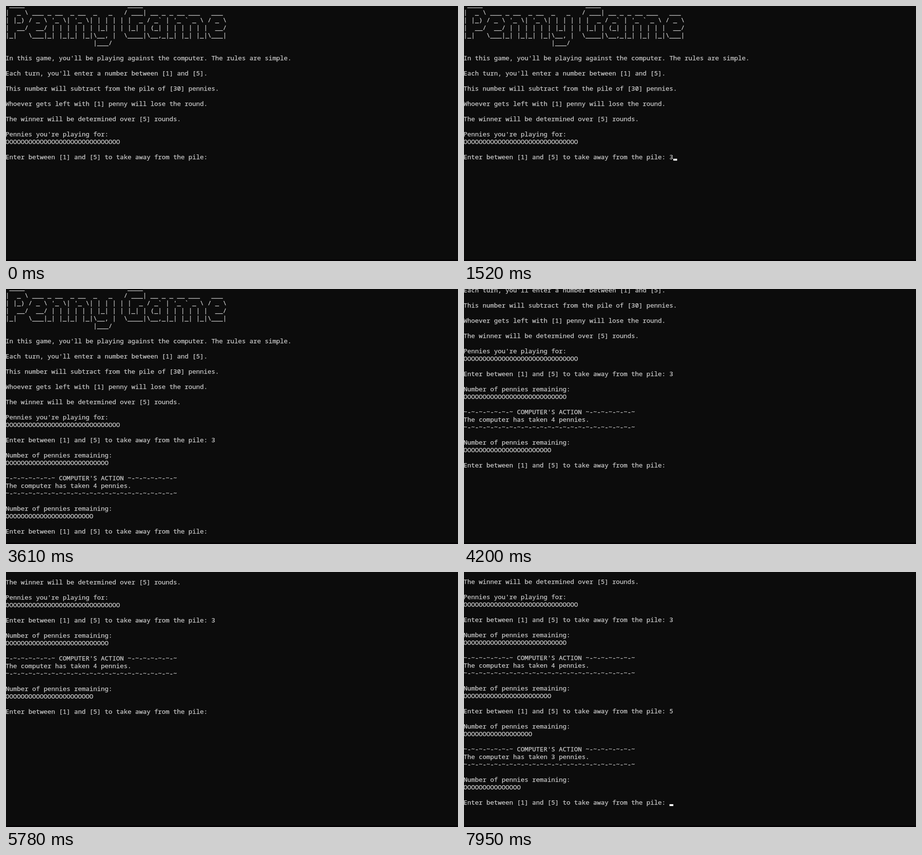
Write an HTML page that moves like this. It is 948x536 px and loops after 8 s.

```html
<!DOCTYPE html>
<html lang="en">
<head>
<meta charset="utf-8">
<title>Penny Game</title>
<style>
  html, body {
    margin: 0;
    width: 100%;
    height: 100%;
    overflow: hidden;
    background: #0c0c0c;
  }
  .stage {
    position: relative;
    width: 100%;
    height: 100%;
    overflow: clip;
    contain: strict;
  }
  /* Console cells are 8 x 16 px. */
  .screen {
    position: absolute;
    left: -1px;
    top: -11px;
    margin: 0;
    color: #ccc;
    font: calc(40px / 3)/16px "Noto Sans Mono", "DejaVu Sans Mono", monospace;
    font-variant-ligatures: none;
    -webkit-text-stroke: 0.25px #ccc;
    white-space: pre;
    animation: scroll 8s step-end infinite;
  }
  .edge {
    position: absolute;
    left: 0;
    right: 0;
    bottom: 0;
    height: 3px;
    background: #040204;
  }
  .screen span { opacity: 0; animation: 8s step-end infinite; }
  .screen .key1 { animation-name: key1; }
  .screen .turn1 { animation-name: turn1; }
  .screen .key2 { animation-name: key2; }
  .screen .turn2 { animation-name: turn2; }
  .cursor {
    position: absolute;
    left: 440px;
    top: 332px;
    width: 8px;
    height: 4px;
    background: #fff;
    opacity: 0;
    animation: blink 8s step-end infinite, move 8s step-end infinite;
  }

  @keyframes scroll {
    52.5% { top: -150px; }
    63.375% { top: -223px; }
    72.25% { top: -227px; }
    74.25%, 100% { top: -228px; }
  }
  @keyframes key1 { 10.875%, 100% { opacity: 1; } }
  @keyframes turn1 { 20.75%, 100% { opacity: 1; } }
  @keyframes key2 { 92.375%, 100% { opacity: 1; } }
  @keyframes turn2 { 99.375%, 100% { opacity: 1; } }
  @keyframes blink {
    0%, 12.5%, 31.75%, 45.125%, 93.125% { opacity: 0; }
    10.875%, 19%, 38.75%, 92.375%, 99.375%, 100% { opacity: 1; }
  }
  @keyframes move {
    0% { left: 440px; top: 332px; }
    20.75% { left: 432px; top: 524px; }
    92.375% { left: 440px; top: 524px; }
    99.375%, 100% { left: 432px; top: 716px; }
  }
</style>
</head>
<body>
<div class="stage">
<pre class="screen"> ____                           ____
|  _ \ ___ _ __  _ __  _   _   / ___| __ _ _ __ ___   ___
| |_) / _ \ '_ \| '_ \| | | | | |  _ / _` | '_ ` _ \ / _ \
|  __/  __/ | | | | | | |_| | | |_| | (_| | | | | | |  __/
|_|   \___|_| |_|_| |_|\__, |  \____|\__,_|_| |_| |_|\___|
                       |___/

In this game, you'll be playing against the computer. The rules are simple.

Each turn, you'll enter a number between [1] and [5].

This number will subtract from the pile of [30] pennies.

Whoever gets left with [1] penny will lose the round.

The winner will be determined over [5] rounds.

Pennies you're playing for:
OOOOOOOOOOOOOOOOOOOOOOOOOOOOOO

Enter between [1] and [5] to take away from the pile: <span class="key1">3</span>

<span class="turn1">Number of pennies remaining:
OOOOOOOOOOOOOOOOOOOOOOOOOOO

~-~-~-~-~-~-~ COMPUTER'S ACTION ~-~-~-~-~-~-~
The computer has taken 4 pennies.
~-~-~-~-~-~-~-~-~-~-~-~-~-~-~-~-~-~-~-~-~-~-~

Number of pennies remaining:
OOOOOOOOOOOOOOOOOOOOOOO

Enter between [1] and [5] to take away from the pile: </span><span class="key2">5</span>

<span class="turn2">Number of pennies remaining:
OOOOOOOOOOOOOOOOOO

~-~-~-~-~-~-~ COMPUTER'S ACTION ~-~-~-~-~-~-~
The computer has taken 3 pennies.
~-~-~-~-~-~-~-~-~-~-~-~-~-~-~-~-~-~-~-~-~-~-~

Number of pennies remaining:
OOOOOOOOOOOOOOO

Enter between [1] and [5] to take away from the pile: </span><i class="cursor"></i></pre>
<div class="edge"></div>
</div>
</body>
</html>
```
